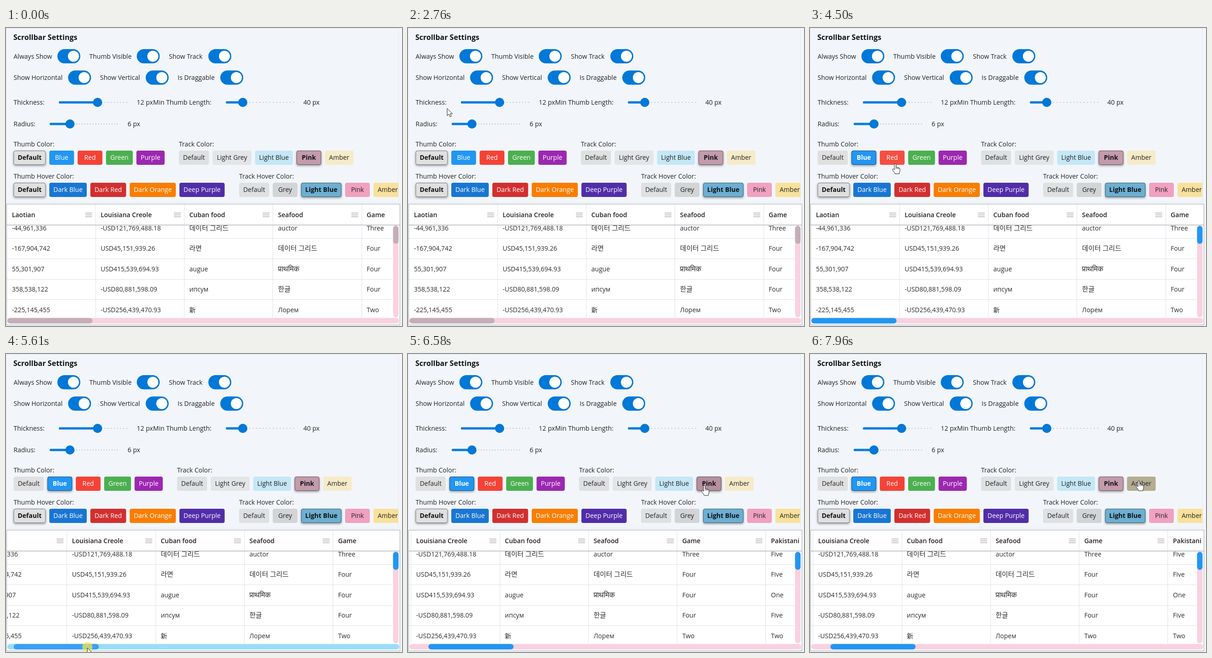
Write an HTML page with a canvas that moves like this. It is 863 by 649 pixels and loops after 8000 ms.

```html
<!DOCTYPE html>
<html lang="en">
<head>
<meta charset="utf-8">
<title>Scrollbar settings</title>
<style>
html, body { margin: 0; width: 100%; height: 100%; overflow: hidden; background: #f2f6fa; }
canvas { display: block; }
</style>
</head>
<body>
<canvas id="stage" width="863" height="649"></canvas>
<script>
const ctx = document.getElementById('stage').getContext('2d');
const LOOP = 8000, SELECT_AT = 3610, DRAG_START = 5540, DRAG_END = 5900;
const FAMILY = '"Open Sans", "Noto Sans", "Noto Sans CJK KR", "Noto Sans CJK JP", "Noto Sans CJK", sans-serif';
const ACCENT = '#0078d7', INK = '#222';

// Pointer path: time, x, y
const path = [
  [190, 586, 622], [400, 599, 385], [800, 599, 385], [940, 605, 300], [1010, 618, 276],
  [1080, 648, 268], [1350, 648, 266], [1560, 647, 248], [1690, 647, 247], [1890, 647, 243],
  [2420, 647, 243], [2620, 240, 150], [2760, 85.5, 174.5], [2910, 66, 272], [3180, 118, 291],
  [3390, 120, 293], [3680, 120, 293], [3950, 186, 345], [4290, 178, 318], [4500, 186, 295],
  [5130, 160, 618], [5340, 163.5, 640], [DRAG_START, 163.5, 640], [5610, 177.1, 640],
  [5820, 205, 640], [DRAG_END, 205, 640], [6300, 520, 369], [6580, 646, 286],
  [6790, 652, 282], [7120, 652, 282], [7400, 610, 280], [7680, 650, 281],
  [7890, 712, 277], [7960, 717, 276]
];

function pointer(t) {
  if (t < path[0][0]) return { x: -99, y: -99 };
  const i = path.findIndex(p => p[0] > t);
  if (i < 0) { const p = path[path.length - 1]; return { x: p[1], y: p[2] }; }
  const [t0, x0, y0] = path[i - 1], [t1, x1, y1] = path[i];
  const k = (t - t0) / (t1 - t0);
  return { x: x0 + (x1 - x0) * k, y: y0 + (y1 - y0) * k };
}

// Button groups: label, fill, width, bold width
const groups = [
  { title: 'Thumb Color:', x: 16.5, y: 267, items: [
    ['Default', '#e0e0e0', 66, 70], ['Blue', '#2196f3', 54], ['Red', '#f44336', 54],
    ['Green', '#4caf50', 58.5], ['Purple', '#9c27b0', 61.5]] },
  { title: 'Track Color:', x: 376.8, y: 267, selected: 3, items: [
    ['Default', '#dfe0e1', 65.5], ['Light Grey', '#e3e5e7', 84.8], ['Light Blue', '#c5e7f6', 82.5],
    ['Pink', '#c39bab', 54], ['Amber', '#f6ebc9', 62.5]] },
  { title: 'Thumb Hover Color:', x: 16.5, y: 337, selected: 0, items: [
    ['Default', '#e0e0e0', 66, 70], ['Dark Blue', '#1976d2', 81.7], ['Dark Red', '#d32f2f', 78],
    ['Dark Orange', '#f97d00', 100.5], ['Deep Purple', '#512da8', 98.6]] },
  { title: 'Track Hover Color:', x: 508, y: 337, selected: 2, items: [
    ['Default', '#dfe0e1', 65.5], ['Grey', '#d3d4d5', 54], ['Light Blue', '#6cafd3', 88],
    ['Pink', '#f0a1c0', 54], ['Amber', '#f8e19c', 62.5]] }
];
const DARK_FILLS = /Red|Green|Purple|Orange|Dark|^Blue/;

const columns = [
  ['Laotian', '-44,961,336', '-167,904,742', '55,301,907', '358,538,122', '-225,145,455'],
  ['Louisiana Creole', '-USD121,769,488.18', 'USD45,151,939.26', 'USD415,539,694.93', '-USD80,881,598.09', '-USD256,439,470.93'],
  ['Cuban food', '데이터 그리드', '라면', 'augue', 'ипсум', '新'],
  ['Seafood', 'auctor', '데이터 그리드', 'प्राथमिक', '한글', 'Лорем'],
  ['Game', 'Three', 'Four', 'Four', 'Four', 'Two'],
  ['Pakistani', 'Five', 'Five', 'One', 'Five', 'Two']
];

function text(str, x, baseline, { weight = 400, size = 14, color = INK, align = 'left' } = {}) {
  ctx.font = `${weight} ${size}px ${FAMILY}`;
  ctx.fillStyle = color;
  ctx.textAlign = align;
  ctx.fillText(str, x, Math.round(baseline));
}

// Fallback scripts run smaller than the Latin face
const cellSize = str => /[가-힣]/.test(str) ? 14.8 : /[ऀ-ॿ]/.test(str) ? 16.5 : 14;

function pill(x, y, w, h, r, fill) {
  ctx.beginPath();
  ctx.roundRect(x, y, w, h, r);
  ctx.fillStyle = fill;
  ctx.fill();
}

function disc(x, y, r, fill) {
  ctx.beginPath();
  ctx.arc(x, y, r, 0, Math.PI * 2);
  ctx.fillStyle = fill;
  ctx.fill();
}

function rect(x, y, w, h, fill) {
  ctx.fillStyle = fill;
  ctx.fillRect(x, y, w, h);
}

function clipped(x, y, w, h, draw) {
  ctx.save();
  ctx.beginPath();
  ctx.rect(x, y, w, h);
  ctx.clip();
  draw();
  ctx.restore();
}

function toggle(label, labelX, x, y) {
  text(label, labelX, y + 5);
  pill(x, y - 15.5, 50, 31, 15.5, ACCENT);
  disc(x + 35, y, 12, '#fff');
}

function slider(label, labelX, x, y, ratio, steps, value, valueX) {
  const width = 148, thumb = x + width * ratio;
  text(label, labelX, y + 5);
  pill(x, y - 2.5, thumb - x, 5, 2.5, ACCENT);
  for (let i = 0; i <= steps; i++) {
    const dotX = x + width * i / steps;
    rect(dotX - .7, y - .7, 1.4, 1.4, dotX < thumb ? 'rgba(255,255,255,.3)' : '#8d9298');
  }
  disc(thumb, y, 10, ACCENT);
  text(value, valueX, y + 5);
}

// Button boxes follow the widths of the labels before them
function layout(t) {
  const picked = t >= SELECT_AT;
  const boxes = [];
  groups.forEach((group, g) => {
    const selected = g === 0 ? +picked : group.selected;
    let x = group.x - (g === 1 && picked ? 4 : 0);
    group.items.forEach(([label, fill, w, boldW = w], i) => {
      const on = i === selected, width = on ? boldW : w;
      boxes.push({ title: i ? '' : group.title, label, fill, x, y: group.y, w: width, h: 31, on });
      x += width + 7.8;
    });
  });
  return boxes;
}

const inside = (p, b) => p.x >= b.x && p.x <= b.x + b.w && p.y >= b.y && p.y <= b.y + b.h;

function button(box, hovered) {
  const { x, y, w, h, label, fill, on } = box;
  const dark = DARK_FILLS.test(label);
  if (box.title) text(box.title, x, y - 9);
  ctx.save();
  if (on) {
    ctx.shadowColor = 'rgba(0,0,0,.4)';
    ctx.shadowBlur = 5;
    ctx.shadowOffsetY = 2;
  }
  pill(x, y, w, h, 4, fill);
  ctx.restore();
  if (hovered) pill(x, y, w, h, 4, on ? 'rgba(0,0,0,.07)' : dark ? 'rgba(255,255,255,.06)' : 'rgba(0,0,0,.27)');
  if (on) {
    ctx.beginPath();
    ctx.roundRect(x + .5, y + .5, w - 1, h - 1, 4);
    ctx.strokeStyle = 'rgba(0,0,0,.45)';
    ctx.lineWidth = 1;
    ctx.stroke();
  }
  text(label, x + w / 2, y + 20, { weight: on ? 700 : 400, color: dark ? '#fff' : on ? '#111' : INK, align: 'center' });
}

function settings(boxes, now, before) {
  ctx.beginPath();
  ctx.roundRect(8.5, -20, 870, 395.5, 9);
  ctx.strokeStyle = '#dadee2';
  ctx.lineWidth = 1;
  clipped(0, 0, 856, 380, () => ctx.stroke());

  text('Scrollbar Settings', 16, 26, { weight: 700, size: 16, color: '#111' });
  toggle('Always Show', 16.5, 112, 61.5);
  toggle('Thumb Visible', 181.5, 285, 61.5);
  toggle('Show Track', 355, 441, 61.5);
  toggle('Show Horizontal', 16.5, 135.3, 108);
  toggle('Show Vertical', 205, 304.5, 108);
  toggle('Is Draggable', 374, 467, 108);
  slider('Thickness:', 16.5, 115, 162, 8 / 14, 22, '12 px', 285);
  slider('Min Thumb Length:', 320.5, 479, 162, .25, 20, '40 px', 648);
  slider('Radius:', 16.5, 95, 209, .3, 25, '6 px', 265);
  clipped(0, 0, 855, 380, () => {
    for (const box of boxes) button(box, inside(now, box) || inside(before, box));
  });
}

function grid(t, now) {
  const pitch = 193.3, rowPitch = 44.4;
  const dragX = pointer(Math.min(Math.max(t, DRAG_START), DRAG_END)).x - pointer(DRAG_START).x;
  const scroll = dragX * 4.54;
  const columnX = i => 2.4 + pitch * i - scroll;

  rect(1, 383, 858, 264, '#fff');
  clipped(2, 384, 856, 46, () => columns.forEach(([title], i) => {
    const x = columnX(i), right = x + pitch;
    text(title, x + 10.5, 412, { weight: 600 });
    for (const y of [403, 407, 411]) rect(right - 23, y - .5, 15, 1, '#888');
    rect(Math.round(right) - 1, 384, 1, 45, '#dfe2ea');
  }));
  clipped(2, 430, 840, 200, () => {
    columns.forEach(([, ...cells], i) => {
      const x = columnX(i);
      cells.forEach((cell, row) => text(cell, x + 10.5, 441 + rowPitch * row,
        { size: cellSize(cell), color: '#2b2b2b' }));
      rect(Math.round(x + pitch) - 1, 430, 1, 200, '#dfe2ea');
    });
    for (let row = 0; row < 4; row++) rect(2, Math.round(458 + rowPitch * row), 840, 1, '#dfe2ea');
  });
  rect(2, 428.5, 856, 1.2, '#a2a5aa');

  const hovered = now.y >= 631 && now.y <= 645;
  const thumb = t >= SELECT_AT ? '#2196f3' : '#c3afb8';
  pill(843.5, 430, 12, 200, 6, '#fad1df');
  pill(843.5, 431, 12, 39, 6, thumb);
  pill(3, 631.5, 854, 12, 6, hovered ? '#9adcfb' : '#fad1df');
  pill(3 + dragX, 631.5, 185.5, 12, 6, hovered ? '#3c9ff2' : thumb);

  ctx.strokeStyle = '#a3a9b1';
  ctx.lineWidth = 1;
  ctx.strokeRect(1.5, 383.5, 857, 263);
}

const ARROW = new Path2D('M0 0V16L3.8 12.6 6.4 18.4 9 17.2 6.5 11.6H11.6Z');
const HAND = new Path2D('M-2 13V2a1.8 1.8 0 0 1 3.6 0v6c.5-1 3-.8 3 .8 .6-.9 2.8-.6 2.8 1 .7-.8 2.6-.3 2.6 1.2V15c0 2-1.5 3.5-1.5 7H-.5C-1 19-5 16-6 13.5c-.8-2 1.5-3 2.5-1.5z');

function cursor(t, now, overButton) {
  const pressed = (t >= 3540 && t < 3680) || (t >= DRAG_START && t < DRAG_END);
  if (pressed) disc(now.x, now.y - 2, 11, 'rgba(244,234,72,.7)');
  ctx.save();
  ctx.translate(now.x, now.y);
  const shape = overButton ? HAND : ARROW;
  ctx.fillStyle = '#fff';
  ctx.fill(shape);
  ctx.strokeStyle = '#222';
  ctx.lineWidth = 1;
  ctx.lineJoin = 'round';
  ctx.stroke(shape);
  if (overButton) {
    ctx.beginPath();
    for (const x of [1.6, 4.6, 7.4]) { ctx.moveTo(x, 8.5); ctx.lineTo(x, 11.5); }
    ctx.stroke();
  }
  ctx.restore();
}

function draw(time) {
  const t = time % LOOP;
  const now = pointer(t), before = pointer(t - 90);
  const boxes = layout(t);
  rect(0, 0, 863, 649, '#f2f6fa');
  settings(boxes, now, before);
  grid(t, now);
  cursor(t, now, boxes.some(box => inside(now, box)));
}

const startTime = performance.now();
function tick() {
  draw(performance.now() - startTime);
  requestAnimationFrame(tick);
}
tick();
</script>
</body>
</html>
```
